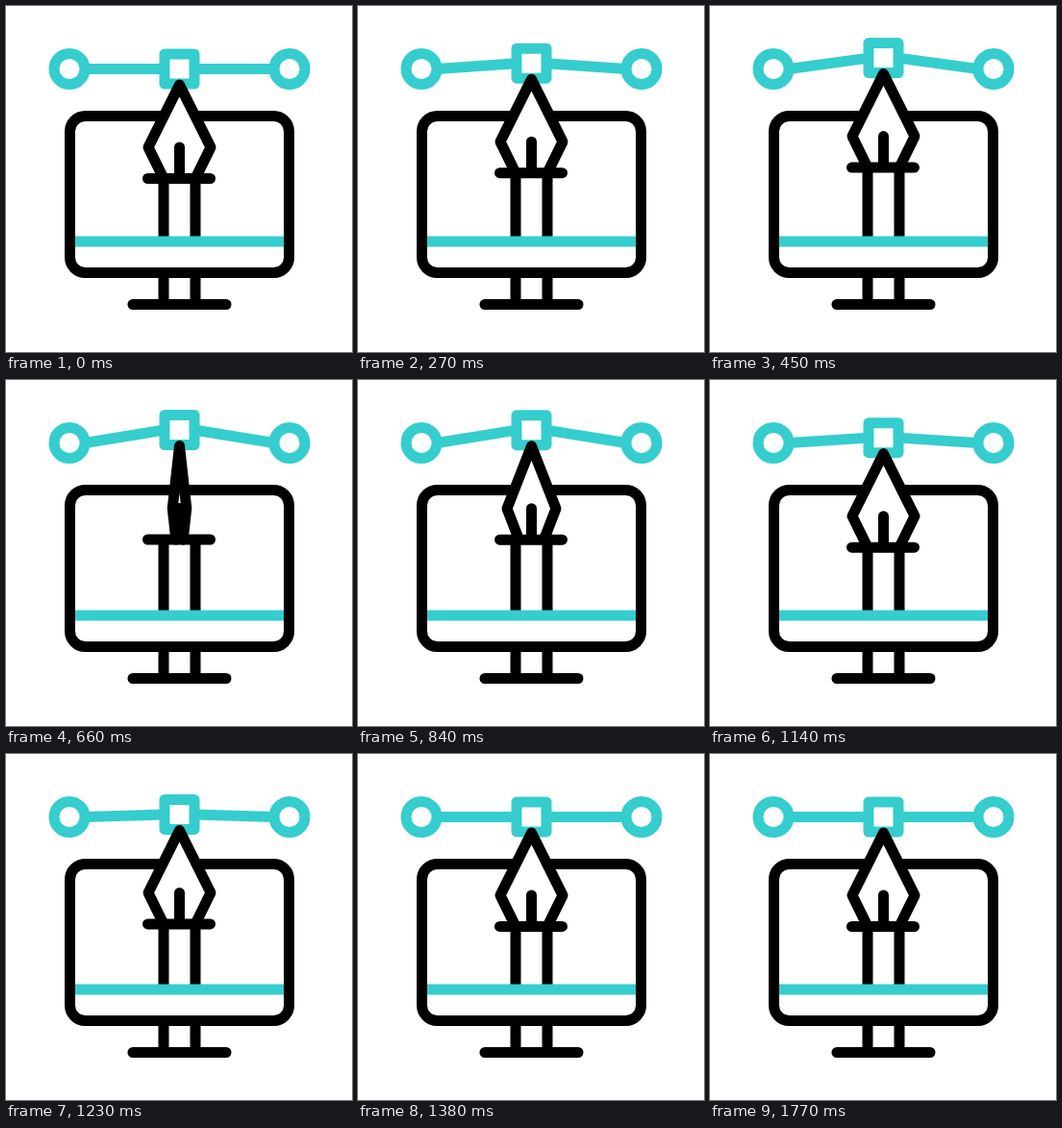
Write an HTML page that moves like this. It is 360x360 px and loops after 1.8 s.

```html
<!DOCTYPE html>
<html lang="en">
<head>
<meta charset="utf-8">
<title>Pen tool on a monitor</title>
<style>
  html, body { margin: 0; width: 100%; height: 100%; overflow: hidden; background: #fff; }
  svg { display: block; width: 100%; height: 100%; }
  .ink, .teal { stroke-width: 11; stroke-linejoin: round; }
  .ink { stroke: #000; }
  .teal { stroke: #35cdcd; }
  .round { stroke-linecap: round; }
</style>
</head>
<body>
<svg viewBox="0 0 360 360" fill="none">
  <g class="ink">
    <rect x="66.5" y="114.5" width="228" height="163" rx="16"/>
    <path d="M164 277V310M197 277V310"/>
    <path class="round" d="M132 310.5H229"/>
    <path id="stem"/>
  </g>
  <path class="teal" d="M72 245H289"/>
  <g class="teal">
    <path id="handles"/>
    <circle cx="66" cy="65.5" r="16"/>
    <circle cx="295" cy="65.5" r="16"/>
    <rect id="anchor" x="165" width="31" height="31" fill="#fff"/>
  </g>
  <g id="pen" class="ink round">
    <path id="nib" fill="#fff"/>
    <path d="M180.5 147V179.5M147.5 179.5H212.5"/>
  </g>
</svg>
<script>
const LOOP = 1800;
const CENTER = 180.5;
const LIFT = 13.5;
const [stem, handles, anchor, pen, nib] =
  ["stem", "handles", "anchor", "pen", "nib"].map(id => document.getElementById(id));

// Eased progress from 0 to 1 between two times
function ease(t, start, end) {
  const u = Math.min(1, Math.max(0, (t - start) / (end - start)));
  return u * u * (3 - 2 * u);
}

function render(t) {
  const dy = -LIFT * (ease(t, 0, 600) - ease(t, 800, 1400));
  const turn = Math.abs(1 - 2 * ease(t, 455, 940));
  const shoulder = 32.5 * turn;
  const base = 16.5 * turn;
  const anchorY = 65.5 + dy;

  anchor.setAttribute("y", anchorY - 15.5);
  handles.setAttribute("d", `M82 65.5L165 ${anchorY}M279 65.5L196 ${anchorY}`);
  stem.setAttribute("d", `M164 ${179.5 + dy}V240M197 ${179.5 + dy}V240`);
  pen.setAttribute("transform", `translate(0 ${dy})`);
  nib.setAttribute("d",
    `M${CENTER - base} 179.5L${CENTER - shoulder} 147L${CENTER} 82` +
    `L${CENTER + shoulder} 147L${CENTER + base} 179.5`);
}

const start = performance.now();
function tick() {
  render((performance.now() - start) % LOOP);
  requestAnimationFrame(tick);
}
tick();
</script>
</body>
</html>
```
